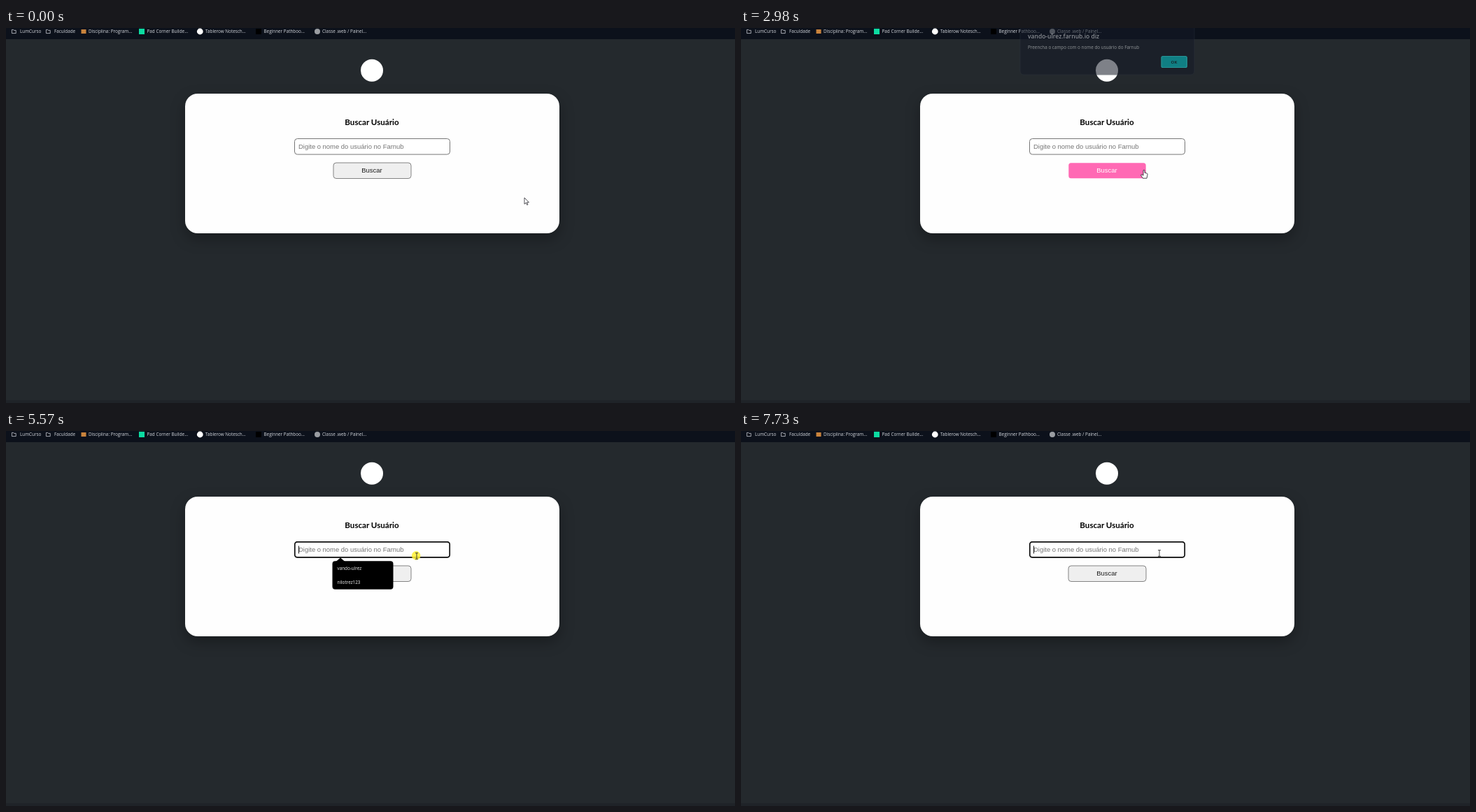
These frames come from a looping animation (1042x537 px, 8 s). An HTML page:

```html
<!DOCTYPE html>
<html lang="pt-BR">
<head>
<meta charset="utf-8">
<title>Buscar Usuário</title>
<style>
html, body { margin: 0; width: 100%; height: 100%; overflow: hidden; background: #24292d; }
svg { display: block; width: 100vw; height: 100vh; }
text { font: 6.35px "Open Sans", "Noto Sans", sans-serif; }
.bar text { fill: #d3d6dc; }
.folder { fill: none; stroke: #c9ccd2; stroke-width: .8; }
.card { filter: drop-shadow(0 8px 10px rgba(0, 0, 0, .3)); }
.title { font: 700 11.6px Lato, sans-serif; text-anchor: middle; }
.field { font: 9.45px "Liberation Sans", Arial, sans-serif; }
.mid { text-anchor: middle; }
.host { font-weight: 600; font-size: 8.5px; fill: #f1f3f6; }
.ok { font-weight: 700; font-size: 6px; text-anchor: middle; fill: #0c2a33; }

/* one loop is 8 s, so 1% is 80 ms */
.anim { opacity: 0; animation: 8s step-end infinite; }
.focus { animation-name: focus; }
.list { animation-name: list; }
.caret { animation-name: caret; }
.hover { animation-name: hover; }
.dialog { animation-name: dialog; animation-timing-function: linear; }
.click { animation-name: click; }
.arrow { animation-name: arrow; }
.hand { animation-name: hand; }
.beam { animation-name: beam; }
.pointer { animation: move 8s linear infinite; }

@keyframes focus {
  0%, 34.5% { opacity: 0; }
  16.375%, 69.6%, 100% { opacity: 1; }
}
@keyframes list {
  0%, 34.5%, 81.1%, 100% { opacity: 0; }
  16.375%, 69.6% { opacity: 1; }
}
@keyframes caret {
  0%, 23%, 34.5%, 75.8% { opacity: 0; }
  16.375%, 29.5%, 69.6%, 94.8%, 100% { opacity: 1; }
}
@keyframes hover {
  0%, 56.1%, 100% { opacity: 0; }
  27.375% { opacity: 1; }
}
@keyframes dialog {
  0%, 35.4%, 58.1%, 81%, 96.5%, 100% { opacity: 0; }
  38.8%, 56.1%, 83.9%, 93.8% { opacity: 1; }
}
@keyframes click {
  0%, 18.2%, 36.2%, 57%, 71.4%, 100% { opacity: 0; }
  16.375%, 34.5%, 55.6%, 69.6% { opacity: 1; }
}
@keyframes arrow {
  0%, 21.2%, 47.1% { opacity: 1; }
  12%, 27.375%, 62.4%, 100% { opacity: 0; }
}
@keyframes hand {
  0%, 47.1%, 100% { opacity: 0; }
  27.375% { opacity: 1; }
}
@keyframes beam {
  0%, 21.2% { opacity: 0; }
  12%, 62.4%, 100% { opacity: 1; }
}
@keyframes move {
  0% { transform: translate(741px, 243px); }
  .875% { transform: translate(741px, 243px); animation-timing-function: ease-in-out; }
  10.875% { transform: translate(644.5px, 178px); }
  11.8% { transform: translate(638px, 176px); }
  12.75% { transform: translate(618px, 171px); }
  14.5% { transform: translate(613px, 170px); }
  18.25% { transform: translate(613px, 170px); animation-timing-function: ease-in-out; }
  26.375% { transform: translate(583px, 202px); }
  30.8%, 47.1% { transform: translate(576px, 203px); }
  52.5% { transform: translate(607.7px, 57.5px); }
  55.25%, 57% { transform: translate(613px, 48px); animation-timing-function: ease-in-out; }
  63.5%, 66.1% { transform: translate(588px, 179px); }
  66.13%, 70.5% { transform: translate(587px, 179px); }
  72.375%, 75% { transform: translate(597px, 176px); }
  75.875%, 100% { transform: translate(598px, 175px); }
}
</style>
</head>
<body>
<svg viewBox="0 0 1042 537">
  <rect width="1042" height="537" fill="#24292d"/>
  <rect y="533" width="1042" height="4" fill="#1f2328"/>

  <g class="bar">
    <rect width="1042" height="16" fill="#0c111b"/>
    <path class="folder" d="M8.4 2.4h2.2l.8 1h2.8v4.2H8.4zM57.4 2.4h2.2l.8 1h2.8v4.2h-5.8z"/>
    <rect x="107.5" y="2" width="7" height="6" fill="#c9833c"/>
    <rect x="190" y="1" width="8" height="8" fill="#0cdba2"/>
    <circle cx="277.3" cy="5" r="4.4" fill="#fff"/>
    <rect x="357" y="1" width="8" height="8" fill="#000"/>
    <circle cx="445" cy="5" r="4" fill="#9a9da2"/>
    <text x="20" y="7.3">LumCurso</text>
    <text x="69" y="7.3">Faculdade</text>
    <text x="118" y="7.3">Disciplina: Program...</text>
    <text x="201.5" y="7.3">Pad Corner Builde...</text>
    <text x="285" y="7.3">Tablerow Notesch...</text>
    <text x="368.5" y="7.3">Beginner Pathboo...</text>
    <text x="452" y="7.3">Classe .web / Painel...</text>
  </g>

  <circle cx="523" cy="60.7" r="16" fill="#fff"/>

  <rect class="card" x="256" y="94" width="535" height="200" rx="18" fill="#fefefe"/>
  <text class="title" x="523" y="138.7">Buscar Usuário</text>

  <rect x="412.5" y="158.5" width="222" height="22.5" rx="4" fill="#fff" stroke="#767676"/>
  <rect class="anim focus" x="412.8" y="158.8" width="221.4" height="22" rx="3.5" fill="#fff" stroke="#101010" stroke-width="1.7"/>
  <text class="field" x="418" y="172.7" fill="#757575">Digite o nome do usuário no Farnub</text>
  <path class="anim caret" d="M418.5 164.5v11" stroke="#000" stroke-width=".9"/>

  <rect x="468" y="193" width="111" height="22.5" rx="4" fill="#efefef" stroke="#767676" stroke-width=".9"/>
  <text class="field mid" x="523" y="207.2" fill="#1c1c1c">Buscar</text>
  <g class="anim hover">
    <rect x="467" y="192" width="113" height="24.5" fill="#fefefe"/>
    <rect x="468.3" y="193.3" width="110.4" height="22" rx="3.5" fill="#ff69b4"/>
    <text class="field mid" x="523" y="207.2" fill="#fff">Buscar</text>
  </g>

  <g class="anim list">
    <path d="M471.5 187l6.5-5.5 6.5 5.5z"/>
    <rect x="466.5" y="186.3" width="87" height="40.5" rx="4"/>
    <g fill="#f4f4f4">
      <text x="473.5" y="198.8">vando-ulrez</text>
      <text x="473.5" y="218.6">nilotrez123</text>
    </g>
  </g>

  <g class="anim dialog">
    <rect x="399" y="-8" width="249" height="75" rx="5" fill="#141a26" stroke="#2d333f" stroke-width=".8"/>
    <text class="host" x="410" y="15">vando-ulrez.farnub.io diz</text>
    <text x="410" y="30" fill="#eceef1">Preencha o campo com o nome do usuário do Farnub</text>
    <rect x="601" y="40.5" width="36.3" height="16" rx="2" fill="#00c8cd" stroke="#2af0f0" stroke-width="1.2"/>
    <text class="ok" x="619" y="50.7">OK</text>
  </g>

  <g class="pointer">
    <circle class="anim click" cx="-.8" cy="-.6" r="6.3" fill="#fff034" fill-opacity=".85"/>
    <path class="anim arrow" d="M0 0V9.2L2.2 7.2 3.7 10.4 5 9.8 3.6 6.7H6.4Z" fill="#fff" stroke="#1d1d24" stroke-width=".75"/>
    <path class="anim hand" d="M-1 1Q0-.6 1 1V4.2L4.4 5.2Q5.3 5.6 5 7.2L4 12.2H-1.6L-4.3 8Q-4.6 6.6-3 6.8L-1 8.2Z" fill="#fff" stroke="#1d1d24" stroke-width=".8"/>
    <path class="anim beam" d="M-2-4.3H2M0-4.3V4.3M-2 4.3H2" fill="none" stroke="#333" stroke-width=".9"/>
  </g>
</svg>
</body>
</html>
```
